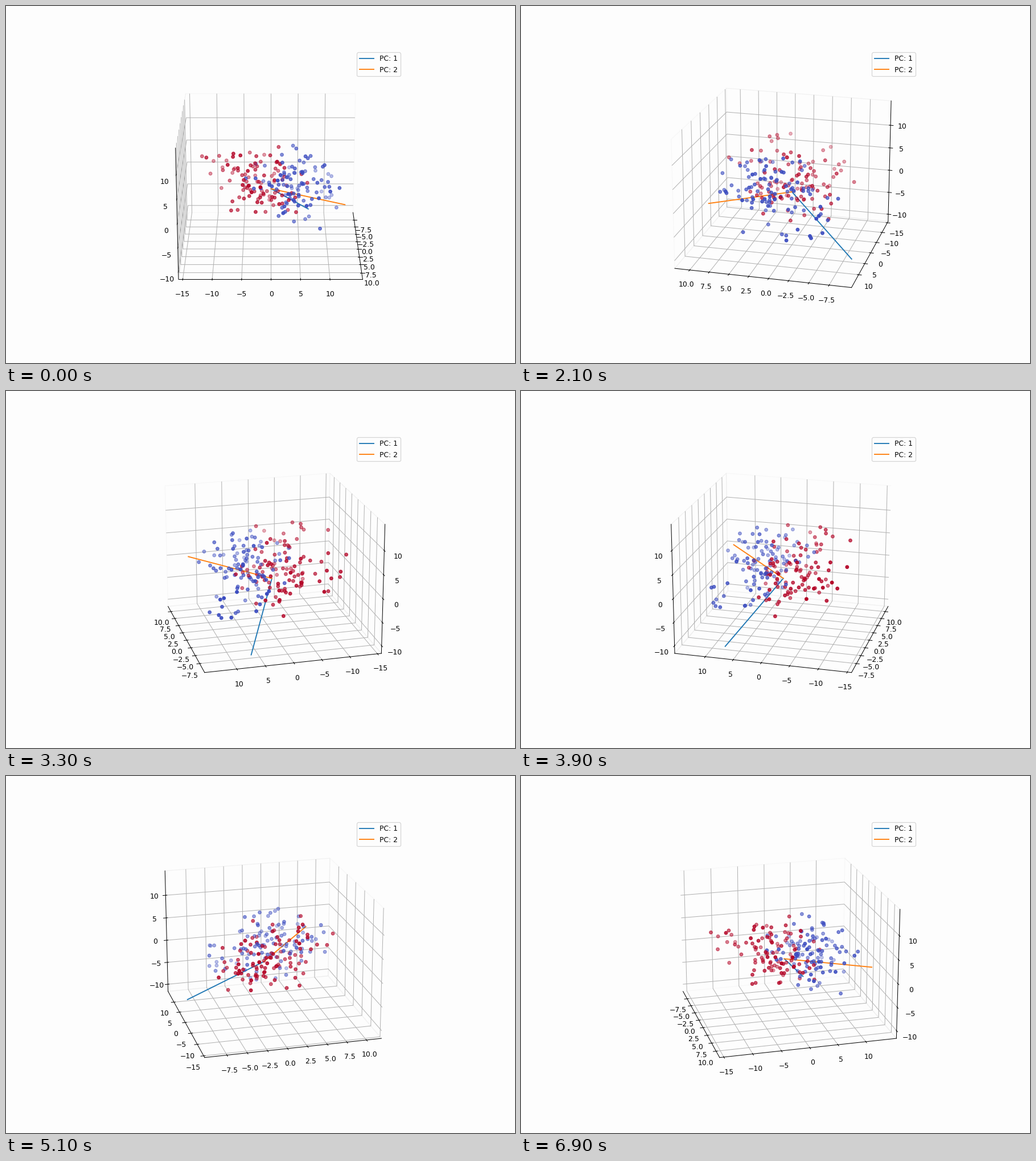
Write a matplotlib script that moves like this. It is 894 px wide and 626 px high and loops after 7.2 s.

```python
import numpy as np
import matplotlib.pyplot as plt
from matplotlib.animation import FuncAnimation

FRAMES = 24
STEP_MS = 300
ELEV = 20
PER_CLASS = 100
PAPER = "#fdfdfd"

plt.rcParams.update({"figure.facecolor": PAPER, "axes.facecolor": PAPER})

# two principal directions, and the one square to both
PC1 = np.array([-8.87, 7.00, -9.96])
PC2 = np.array([8.09, 12.61, 1.52])
basis = np.array([PC1, PC2, np.cross(PC1, PC2)])
basis /= np.linalg.norm(basis, axis=1, keepdims=True)

MIDDLE = np.array([0.9, 0.7, 1.7])
HALF_GAP = np.array([0.5, 3.5, -0.2])
SPREAD = (4.3, 4.2, 3.0)  # deviation along each direction


def cloud(rng, center):
    """Gaussian samples around center, far tails dropped."""
    pts = rng.normal(size=(PER_CLASS * 2, 3))
    pts = pts[np.linalg.norm(pts, axis=1) < 2.6][:PER_CLASS]
    return center + pts * SPREAD @ basis


rng = np.random.default_rng(12)
red = cloud(rng, MIDDLE - HALF_GAP)
blue = cloud(rng, MIDDLE + HALF_GAP)
points = np.vstack([red, blue])
label = np.repeat([1, 0], [len(red), len(blue)])

# 894 x 626 pixels
fig = plt.figure(figsize=(10, 7.00224), dpi=89.4)
ax = fig.add_subplot(projection="3d")
ax.scatter(*points.T, c=label, cmap="coolwarm")
for n, end in enumerate((PC1, PC2), 1):
    ax.plot(*([0, v] for v in end), label=f"PC: {n}")
ax.legend(loc="upper right")

ax.set(xlim=(-10.23, 11.93), ylim=(-15.72, 15.55), zlim=(-11.645, 15.35),
       xticks=np.arange(-7.5, 10.1, 2.5), yticks=np.arange(-15, 11, 5),
       zticks=np.arange(-10, 11, 5))
for axis in (ax.xaxis, ax.yaxis, ax.zaxis):
    axis.pane.set_fill(False)


def update(i):
    ax.view_init(ELEV, i * 360 / FRAMES)
    return ()


anim = FuncAnimation(fig, update, frames=FRAMES, interval=STEP_MS,
                     init_func=lambda: update(0), repeat=True, repeat_delay=0)
plt.show()
```
